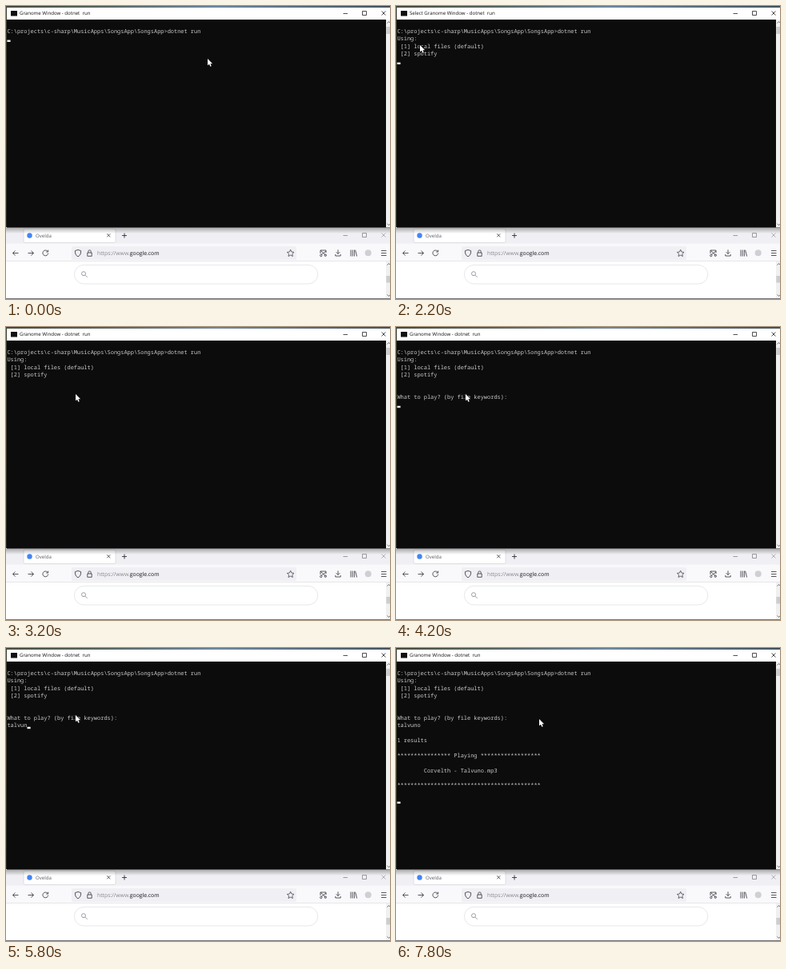
Animation, 480 px wide and 367 px high, one loop 8000 ms. Source, as an HTML page with a canvas:

```html
<!DOCTYPE html>
<html lang="en">
<head>
<meta charset="utf-8">
<title>Terminal session</title>
<style>
html, body { margin: 0; width: 100%; height: 100%; overflow: hidden; background: #fff; }
canvas { display: block; width: 480px; height: 367px; }
</style>
</head>
<body>
<canvas id="stage"></canvas>
<script>
const W = 480, H = 367, LOOP = 8000, STEP = 200, BLINK = 530;
const MONO = '6.967px "Noto Sans Mono", "DejaVu Sans Mono", monospace';
const sans = size => size + 'px "Open Sans", "Noto Sans", sans-serif';
const COL = 4.18, ROW = 9.37, LEFT = 1.4, BASE = 33.9;

const canvas = document.getElementById('stage');
const ctx = canvas.getContext('2d');
const dpr = window.devicePixelRatio || 1;
canvas.width = W * dpr;
canvas.height = H * dpr;

const PROMPT = 'C:\\projects\\c-sharp\\MusicApps\\SongsApp\\SongsApp>dotnet run';
const QUERY = 'talvuno';
const MENU_AT = 800, SELECT_AT = 1800, RESUME_AT = 2600, ASK_AT = 3800;
const TYPE_AT = 4800, KEY_MS = 200, RESULT_AT = 6600;

// Blocks of output: time, first row, lines
const OUTPUT = [
  [0, 0, [PROMPT]],
  [MENU_AT, 1, ['Using:', ' [1] local files (default)', ' [2] spotify']],
  [ASK_AT, 6, ['What to play? (by file keywords):']],
  [RESULT_AT, 9, [
    '1 results', '',
    '*'.repeat(16) + ' Playing ' + '*'.repeat(18), '',
    '        Corvelth - Talvuno.mp3', '',
    '*'.repeat(43)
  ]]
];

// Pointer moves: start, end, target
const MOVES = [
  [1400, 1800, 30, 49],
  [2400, 3000, 87, 84],
  [6800, 7600, 179, 89]
];

function rect(x, y, w, h, color) {
  ctx.fillStyle = color;
  ctx.fillRect(x, y, w, h);
}

function roundRect(x, y, w, h, r, fill, line) {
  ctx.beginPath();
  ctx.roundRect(x, y, w, h, r);
  if (fill) { ctx.fillStyle = fill; ctx.fill(); }
  if (line) { ctx.strokeStyle = line; ctx.lineWidth = 0.8; ctx.stroke(); }
}

function text(str, x, y, font, color) {
  ctx.font = font;
  ctx.fillStyle = color;
  ctx.fillText(str, x, y);
}

function stroke(path, color, width = 0.9) {
  ctx.strokeStyle = color;
  ctx.lineWidth = width;
  ctx.stroke(new Path2D(path));
}

function disc(x, y, r, color) {
  ctx.fillStyle = color;
  ctx.beginPath();
  ctx.arc(x, y, r, 0, Math.PI * 2);
  ctx.fill();
}

function windowButtons(y, color, closeColor) {
  stroke(`M421.5 ${y + 0.5}h5.5`, color, 0.8);
  stroke(`M445.5 ${y - 2.5}h5v5h-5z`, color, 0.8);
  stroke(`M469.5 ${y - 2.5}l5 5m0-5l-5 5`, closeColor, 0.8);
}

function scrollBar(top, bottom, thumbTop, thumbHeight) {
  rect(475, top, 5, bottom - top, '#f0f0f0');
  rect(475.3, thumbTop, 4.7, thumbHeight, '#cdcdcd');
  stroke(`M476.5 ${top + 4.5}l2-2l2 2M476.5 ${bottom - 4.5}l2 2l2-2`, '#606060', 0.9);
}

function desktop() {
  const top = ctx.createLinearGradient(0, 0, W, 0);
  top.addColorStop(0, '#454a3d');
  top.addColorStop(0.25, '#55635f');
  top.addColorStop(0.55, '#6a87a0');
  top.addColorStop(1, '#41525f');
  rect(0, 0, W, 3, top);
  const side = ctx.createLinearGradient(0, 0, 0, 278);
  side.addColorStop(0, '#3b3d30');
  side.addColorStop(0.5, '#47422f');
  side.addColorStop(1, '#252720');
  rect(0, 2, 1, 276, side);
}

function browser() {
  rect(0, 277, W, 21, '#f0f0f4');
  roundRect(22, 279, 115, 17.5, 2, '#fff', '#d8d8dd');
  disc(29.5, 287.5, 3.2, '#4285f4');
  text('Ovelda', 37, 289.8, sans(6.1), '#5b5b66');
  stroke('M126.3 285.3l4 4m0-4l-4 4', '#33333b', 0.8);
  stroke('M145 287.5h6m-3-3v6', '#33333b', 0.9);
  windowButtons(287, '#85858a', '#a0a0a5');

  rect(0, 297.5, W, 22.5, '#f9f9fb');
  rect(0, 319.5, W, 0.7, '#d5d5da');
  roundRect(82, 301, 281, 17, 2, '#f0f0f4');
  const ink = '#45454d';
  stroke('M15.5 309.5h-7m3-3l-3 3l3 3', ink);
  stroke('M27.5 309.5h7m-3-3l3 3l-3 3', ink);
  stroke('M52 307.3a3.4 3.4 0 1 0 .7 2.4M52.7 305.6v2.4h-2.5', ink);
  stroke('M90 305.4l3.6 1.2c.2 3.6-.8 5.7-3.6 7.3c-2.8-1.6-3.8-3.7-3.6-7.3z', ink);
  stroke('M101.8 309h5.4v4.3h-5.4zM102.8 309v-1.5a1.7 1.7 0 0 1 3.4 0v1.5', ink);
  text('https://www.', 114, 312.1, sans(6.83), '#85858d');
  const host = 114 + ctx.measureText('https://www.').width;
  text('google.com', host, 312.1, sans(6.83), '#15141a');
  stroke('M355.7 305.2l1.3 2.8l3 .4l-2.2 2.1l.6 3l-2.7-1.5l-2.7 1.5l.6-3l-2.2-2.1l3-.4z', ink, 0.8);

  stroke('M393 310v-4h7v3M393 306l6.5 6M400 307l-6 4.5M395 312.5a1.2 1.2 0 1 1-2.4 0a1.2 1.2 0 1 1 2.4 0M400.5 312.2a1.2 1.2 0 1 1-2.4 0a1.2 1.2 0 1 1 2.4 0', ink);
  stroke('M415 305.3v5.2m-2.3-2.3l2.3 2.3l2.3-2.3M411.8 311v2h6.4v-2', ink);
  stroke('M431 305.5v8m2.2-8v8m2.2-8v8m1.2-7.8l2 7.8', ink);
  disc(452.7, 309.3, 4, '#cfcfd4');
  stroke('M469 306.5h6.5m-6.5 3h6.5m-6.5 3h6.5', ink);

  rect(0, 320, W, 47, '#fff');
  roundRect(85.4, 324.4, 304.4, 23.6, 11.8, '#fff', '#dfe1e5');
  stroke('M99.5 335.2a2.5 2.5 0 1 1-5 0a2.5 2.5 0 1 1 5 0M98.9 337.1l2.8 2.8', '#9aa0a6', 1);
  scrollBar(320, 366, 338, 8.5);
  rect(0, 366, W, 1, '#77777a');
}

function terminalWindow(title) {
  const shade = ctx.createLinearGradient(0, 278, 0, 285);
  shade.addColorStop(0, 'rgba(0,0,0,.28)');
  shade.addColorStop(1, 'rgba(0,0,0,0)');
  rect(0, 278, W, 7, shade);
  rect(1, 2, 479, 276, '#fff');
  rect(1, 17, 474, 260.5, '#0c0c0c');
  rect(1, 277.2, 479, 0.8, '#55555a');
  scrollBar(17, 277.2, 26, 9);
  rect(6, 6, 8, 6.5, '#111');
  text(title, 17, 11.4, sans(6.1), '#111');
  windowButtons(9, '#222', '#222');
}

function caretOn(t, typed) {
  if (t >= SELECT_AT && t < RESUME_AT) return true;
  const resets = [0, MENU_AT, RESUME_AT, ASK_AT, RESULT_AT];
  if (typed) resets.push(TYPE_AT + (typed - 1) * KEY_MS);
  const last = Math.max(...resets.filter(r => r <= t));
  return (t - last) % (2 * BLINK) < BLINK;
}

function session(t) {
  const print = (str, row) => text(str, LEFT, BASE + row * ROW, MONO, '#cccccc');
  for (const [at, row, lines] of OUTPUT) {
    if (t >= at) lines.forEach((line, i) => print(line, row + i));
  }
  const typed = Math.max(0, Math.min(QUERY.length, Math.floor((t - TYPE_AT) / KEY_MS) + 1));
  print(QUERY.slice(0, typed), 7);

  const row = t < MENU_AT ? 1 : t < ASK_AT ? 4 : t < RESULT_AT ? 7 : 17;
  const col = row === 7 ? typed : 0;
  if (caretOn(t, typed)) {
    rect(LEFT + col * COL, BASE + row * ROW - 0.7, COL, 2.4, '#f2f2f2');
  }
}

function pointer(t) {
  let x = 252, y = 66;
  for (const [from, to, tx, ty] of MOVES) {
    const p = Math.max(0, Math.min(1, (t - from) / (to - from)));
    const e = p * p * (3 - 2 * p);
    x += (tx - x) * e;
    y += (ty - y) * e;
  }
  const arrow = new Path2D('M0 0v8.6l2-1.8l1.3 3l1.5-.6l-1.3-3h2.7z');
  ctx.save();
  ctx.translate(x, y);
  ctx.strokeStyle = '#000';
  ctx.lineWidth = 1;
  ctx.stroke(arrow);
  ctx.fillStyle = '#fff';
  ctx.fill(arrow);
  ctx.restore();
}

function draw(now) {
  const t = Math.floor((now % LOOP) / STEP) * STEP;
  const selecting = t >= SELECT_AT && t < RESUME_AT;
  ctx.setTransform(dpr, 0, 0, dpr, 0, 0);
  ctx.textRendering = 'geometricPrecision';
  rect(0, 0, W, H, '#fff');
  desktop();
  browser();
  terminalWindow((selecting ? 'Select ' : '') + 'Granome Window - dotnet  run');
  session(t);
  pointer(t);
}

const start = performance.now();
function tick() {
  draw(performance.now() - start);
  requestAnimationFrame(tick);
}
tick();
</script>
</body>
</html>
```
